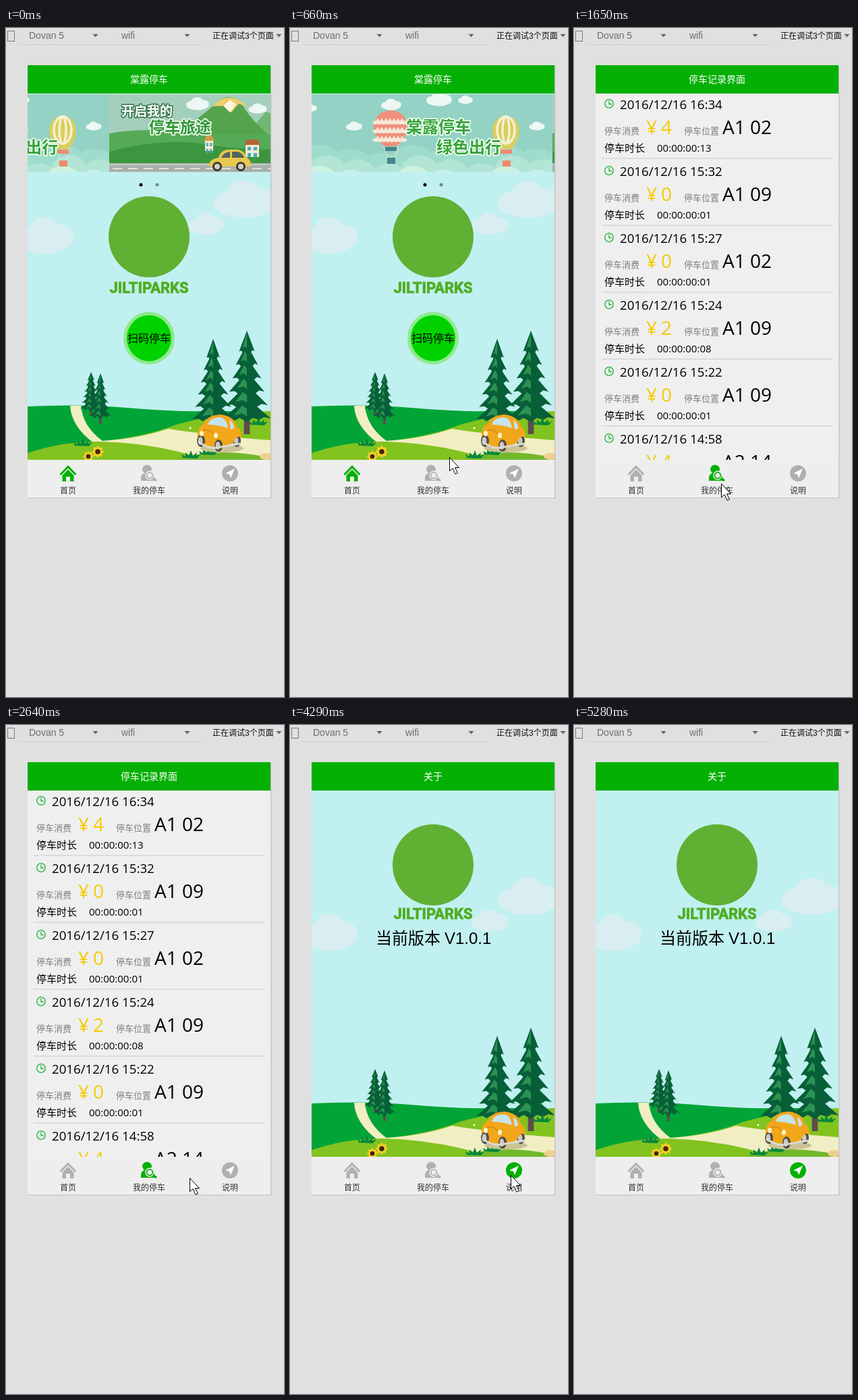
Write an HTML page that moves like this. It is 412 px wide and 990 px high and loops after 8580 ms.

```html
<!DOCTYPE html>
<html lang="zh">
<head>
<meta charset="utf-8">
<style>
  html, body { margin: 0; width: 100%; height: 100%; overflow: hidden; background: #e0e0e0; }
  svg { display: block; }
  text { font-family: "Liberation Sans", "Noto Sans CJK SC", "Noto Sans CJK", sans-serif; }
  .mid { text-anchor: middle; }
  .record text { font-family: "Open Sans", "Noto Sans CJK SC", "Noto Sans CJK", sans-serif; }
  .word { font: 700 22px Roboto, sans-serif; fill: #4fae22; stroke: #4fae22; stroke-width: .8; }
  .slogan { font-weight: 900; paint-order: stroke; stroke-width: 3.5; stroke-linejoin: round; }
  .tab { color: #b0b0b0; }
  .tab.on { color: #04b004; }
</style>
</head>
<body>
<svg id="stage" width="412" height="990" viewBox="0 0 412 990"></svg>
<script>
const LOOP = 8580;
const TITLES = ['棠露停车', '停车记录界面', '关于'];
// start time, open tab, cursor x, cursor y
const STEPS = [
  [0, 0], [330, 0], [660, 0, 236, 635], [990, 0, 218, 673], [1320, 0, 218, 674],
  [1650, 1, 218, 674], [2640, 1, 272, 670], [3630, 1, 326, 666], [3960, 1, 327, 666],
  [4290, 2, 327, 666], [4950, 2, 322, 656], [5280, 2]
];
const RECORDS = [
  ['16:34', 4, 'A1 02', 13], ['15:32', 0, 'A1 09', '01'], ['15:27', 0, 'A1 02', '01'],
  ['15:24', 2, 'A1 09', '08'], ['15:22', 0, 'A1 09', '01'], ['14:58', 4, 'A2 14', 13]
];

const path = (d, fill, extra = '') => `<path d="${d}" fill="${fill}" ${extra}/>`;
const line = (d, stroke, width = 1) => path(d, 'none', `stroke="${stroke}" stroke-width="${width}"`);
const rect = (x, y, w, h, fill, extra = '') =>
  `<rect x="${x}" y="${y}" width="${w}" height="${h}" fill="${fill}" ${extra}/>`;
const oval = (x, y, rx, ry, fill, extra = '') =>
  `<ellipse cx="${x}" cy="${y}" rx="${rx}" ry="${ry}" fill="${fill}" ${extra}/>`;
const text = (x, y, size, fill, s, extra = '') =>
  `<text x="${x}" y="${y}" font-size="${size}" fill="${fill}" ${extra}>${s}</text>`;
const group = (attrs, ...parts) => `<g ${attrs}>${parts.join('')}</g>`;
const each = (list, draw) => list.map(draw).join('');

const caret = x => path(`M${x} 9h8l-4 4.5z`, '#666');

// puffy cloud inside the box x, y, w, h
const cloud = (x, y, w, h, fill) =>
  oval(x + w * .22, y + h * .6, w * .22, h * .3, fill) +
  oval(x + w * .48, y + h * .38, w * .27, h * .38, fill) +
  oval(x + w * .76, y + h * .55, w * .24, h * .34, fill) +
  oval(x + w * .5, y + h * .75, w * .38, h * .25, fill);

function tree(x, top, w, h) {
  let out = rect(x - w * .06, top + h * .7, w * .12, h * .3, '#5f4b4d');
  for (let i = 5; i >= 0; i--) {
    const y = top + h * .13 * i, half = w * (.16 + .068 * i), drop = h * .2;
    out += path(`M${x} ${y}L${x + half} ${y + drop}l${-half * .3} -2l${-half * .2} 4l${-half * .25} -3
      L${x} ${y + drop + 5}l${-half * .3} -6l${-half * .2} 4l${-half * .2} -4L${x - half} ${y + drop}z`, '#075f38');
    out += path(`M${x} ${y + 3}l${-half * .55} ${drop * .75}l${half * .35} -3l${half * .2} 4z`, '#2c9152');
  }
  return out;
}

const tuft = (x, y) => path(`M${x - 12} ${y}l-2 -5 6 3 0 -6 5 5 3 -8 3 8 6 -5 -1 5 6 -2 -5 6z`, '#07873a');
const flower = (x, y, r) =>
  each([0, 45, 90, 135], a => oval(x, y, r, r * .35, '#f3cf25', `transform="rotate(${a} ${x} ${y})"`)) +
  oval(x, y, r * .42, r * .42, '#40250c');

function beetle() {
  const wheel = (x, y) => oval(x, y, 6, 9, '#4d4a46') + oval(x - 1, y, 3.5, 6, '#c9c7c0');
  return oval(320, 622, 32, 6, '#c9c295') + wheel(342, 611) +
    path('M284 606Q283 590 294 585Q298 573 318 572Q338 574 342 590Q350 594 349 607Q342 600 336 614L321 622L290 617Z', '#f2a71b') +
    path('M299 587Q302 576 318 576Q327 578 329 592Q313 587 299 587Z', '#c4e4ed') +
    path('M331 580Q338 584 338 593L333 594Z', '#c4e4ed') +
    line('M287 600Q301 586 312 608', '#cb820d', 1.2) + wheel(315, 618) + wheel(289, 611) +
    line('M285 612Q300 623 312 621L348 615', '#d9dad2', 3) +
    oval(290, 600, 3, 4, '#fff3c3') + oval(311, 603, 3, 4, '#fff3c3');
}

const landscape = () =>
  rect(32, 97, 360, 545, '#c1f0f0') +
  cloud(308, 226, 92, 55, '#d9eef0') + cloud(269, 273, 54, 33, '#d9eef0') + cloud(18, 280, 82, 54, '#d9eef0') +
  path('M32 560Q110 556 180 562T290 567Q340 566 392 570V640H32Z', '#02a437') +
  path('M140 612Q210 604 252 587Q320 568 392 567V640H140Z', '#82c320') +
  path('M95 559H111Q114 590 143 611Q200 607 240 593Q300 603 392 606V640H285Q220 617 130 614Q97 590 95 559Z', '#f2eec4') +
  path('M285 597Q330 596 392 603V610Q340 606 285 601Z', '#82c320') +
  path('M32 629Q85 611 140 612Q225 614 300 640H32Z', '#82c320') +
  path('M250 640Q310 618 392 636V640Z', '#72b82b') + oval(386, 634, 10, 5, '#efcf90') +
  tree(126, 509, 32, 64) + tree(140, 511, 34, 75) + tree(307, 460, 62, 140) + tree(357, 448, 72, 153) +
  tuft(114, 618) + tuft(274, 636) + tuft(300, 631) + tuft(374, 587) +
  oval(273, 592, 1.5, 1.5, '#fff') + beetle() + flower(136, 627, 9) + flower(122, 634, 8);

// the mark as a plain disc with its wordmark below
const brand = (y, base) => oval(212, y, 60, 60, '#60b033') + text(212, base, 22, '#4fae22', 'JILTIPARKS', 'class="word mid"');

function balloon(x, y, rx, ry, fill, basket) {
  const bottom = y + ry, end = bottom + 32;
  return line(`M${x - rx * .6} ${bottom - 4}L${x - 4} ${end - 8}M${x + rx * .6} ${bottom - 4}L${x + 6} ${end - 8}`, '#d9e6d3') +
    path(`M${x - rx} ${y}A${rx} ${ry} 0 0 1 ${x + rx} ${y}Q${x + rx} ${y + ry * .7} ${x + 9} ${bottom + 7}H${x - 9}Q${x - rx} ${y + ry * .7} ${x - rx} ${y}Z`, fill) +
    rect(x - 8, bottom + 8, 17, 6, basket) + rect(x - 5, end - 8, 12, 9, basket);
}
const scallops = (y, r, fill) => each([...Array(9).keys()], i => oval(i * 46 + (r % 7) * 5, y + (i % 3) * 6, r, r * .75, fill));
const smallCloud = (x, y, w = 24) => cloud(x - w / 2, y - w * .28, w, w * .56, '#eef7f3');

function skyBanner() {
  const bars = each([-10, 3, 16], dy => line(`M95 ${50 + dy}${'q3 5 6 0 3 5 6 0'.repeat(4)}`, '#f5e9d8', 5));
  const ribs = each([5, 13], r => oval(291, 53, r, 20, 'none', 'stroke="#f5f0d5" stroke-width="3.5"'));
  return rect(0, 0, 360, 116, '#93d2c4') +
    scallops(98, 31, '#a0dccc') + scallops(110, 26, '#b2e5d5') + scallops(124, 24, '#cdf1e0') +
    smallCloud(192, 7, 38) + smallCloud(121, 15, 30) + smallCloud(66, 47) + smallCloud(0, 20, 22) +
    smallCloud(337, 47, 23) + smallCloud(231, 8, 22) +
    balloon(120, 47, 25, 23, '#f08f7c', '#42868b') + bars +
    balloon(291, 53, 20, 21, '#d9cf5d', '#ee8b6d') + ribs +
    text(143, 57, 24, '#35a43b', '棠露停车', 'class="slogan" stroke="#f3fff1"') +
    text(188, 87, 24, '#35a43b', '绿色出行', 'class="slogan" stroke="#f3fff1"');
}

function roadBanner() {
  const house = (x, y, w, h, roof) => rect(x, y, w, h, '#f5ead0') +
    path(`M${x - 2} ${y}l4 -8h${w - 4}l4 8z`, roof) +
    each([.15, .6], k => rect(x + w * k, y + 3, w * .25, 5, '#49aabd') + rect(x + w * k, y + 12, w * .25, 6, '#49aabd'));
  const wheel = x => oval(x, 107, 7, 7, '#3e3935') + oval(x, 107, 4, 4, '#d5d1c5');
  return rect(0, 0, 360, 116, '#a5cfbd') +
    smallCloud(131, 14, 34) + smallCloud(220, 21, 27) + smallCloud(305, 24, 32) +
    path('M195 70L232 26Q260 33 330 75Z', '#72b773') +
    path('M75 78Q125 42 163 10Q178 -2 195 11Q210 42 258 78Z', '#53a44d') +
    path('M153 18Q179 -9 205 19L192 14 181 27 171 17Z', '#efcd6a') + path('M169 17l10 10 9 -12 -9 -7z', '#fff4da') +
    path('M0 58Q50 49 120 56T360 55V106H0Z', '#55aa58') + path('M0 85Q80 63 150 75T360 77V106H0Z', '#3c963f') +
    rect(0, 102, 360, 14, '#a9afac') + line('M0 104H360', '#dde0db') +
    line('M5 110H360', '#f1f3ed', 1.5).replace('/>', 'stroke-dasharray="14 9"/>') +
    house(142, 69, 12, 15, '#d69b45') + house(202, 75, 20, 18, '#b76334') +
    path('M148 107Q147 96 162 94Q165 82 178 82H191Q201 84 204 94Q212 98 209 107Z', '#e8c84d') +
    path('M166 94Q169 86 179 85V94ZM182 85H190Q198 87 200 94H182Z', '#52665d') + wheel(160) + wheel(195) +
    text(18, 32, 19, '#fff', '开启我的', 'class="slogan" stroke="#427f55"') +
    text(59, 57, 23, '#2f963a', '停车旅途', 'class="slogan" stroke="#eefbe9"');
}

const home = () => group('class="screen"', landscape(),
  group('clip-path="url(#bannerClip)"', group('id="slides"',
    group('transform="translate(32 98)"', skyBanner()), group('transform="translate(392 98)"', roadBanner()))),
  line('M32 97.5H392', '#e2f5ec'),
  oval(200, 232, 2.5, 2.5, '#000'), oval(224, 232, 2.5, 2.5, '#6f8c8c'), brand(309, 392),
  oval(212, 459, 38, 39, '#8eea8e'), oval(212, 459, 33, 34, '#00d200'),
  text(212, 465, 16, '#000', '扫码停车', 'class="mid"'));

const records = () => group('class="screen"', rect(32, 97, 360, 543, '#efefef'),
  each(RECORDS, ([time, cost, place, seconds], i) => group(`class="record" transform="translate(0 ${i * 99})"`,
    oval(52, 112, 6.3, 6.3, 'none', 'stroke="#1db53c" stroke-width="1.3"'), line('M52 107.5V112.5H56', '#1db53c', 1.3),
    text(68, 120, 18.7, '#000', '2016/12/16 ' + time),
    text(45, 157, 13, '#7d7d7d', '停车消费'), text('107 129', 157, 28, '#f6cb05', '¥' + cost),
    text(163, 157, 13, '#7d7d7d', '停车位置'), text(220, 157, 28, '#000', place),
    text(45, 183, 15, '#000', '停车时长'), text(123, 183, 15, '#000', '00:00:00:' + seconds),
    line('M41 193H384', '#dcdcdc', 2))));

const about = () => group('class="screen"', landscape(), brand(207, 287),
  text(127, 324, 24, '#000', '当前版本', 'font-weight="300"'), text(229, 324, 24, '#000', 'V1.0.1'));

const ICONS = [
  path('M79.500 660L92 647l12.500 13 -2 2L92 651.500 81.500 662z', 'currentColor') +
    path('M83.500 662L92 653.500l8.500 8.500V671H95V664H89V671H83.500z', 'currentColor'),
  oval(209, 653, 7, 6.5, 'currentColor') + path('M200 670Q199 659 207 658H214Q222 660 220 670Z', 'currentColor') +
    oval(213, 662, 6, 6, 'currentColor', 'stroke="#eee" stroke-width="1.5"') + oval(213, 662, 3.5, 3.5, '#eee') +
    line('M218 666L223 670', 'currentColor', 3),
  oval(332, 659, 12, 12, 'currentColor') + path('M339 652L325 659 331 660.500 333 666Z', '#fff')
];
const tabs = () => rect(32, 639, 360, 56, '#eee') +
  each(['首页', '我的停车', '说明'], (label, i) => group('class="tab"', ICONS[i],
    text(92 + 120 * i, 689, 12, '#333', label, 'class="mid"')));

stage.innerHTML =
  `<defs><clipPath id="phoneClip">${rect(32, 55, 360, 640, '#000')}</clipPath>
   <clipPath id="bannerClip">${rect(32, 98, 360, 115, '#000')}</clipPath></defs>` +
  rect(0, 0, 412, 990, '#e0e0e0') +
  rect(2.5, 4.5, 10, 15, 'none', 'stroke="#777"') +
  text(34, 16, 14, '#6e6e6e', 'Dovan 5') + text(171, 16, 14, '#6e6e6e', 'wifi') +
  text(306, 16, 12, '#111', '正在调试3个页面') + each([128.5, 264.5, 400.5], caret) + line('M19 24.5H293', '#cecece') +
  rect(33, 56, 360, 640, '#c4c4c4') + line('M393.5 57V696', '#d5d5d5') +
  group('clip-path="url(#phoneClip)"', home(), records(), about(), tabs(),
    rect(32, 55, 360, 42, '#04b004'), text(212, 81, 14, '#fff', '', 'id="heading" class="mid"')) +
  path('M.5 .5V20.500L5 16.500 9 25 12.500 23.500 8.500 15.500H14.500Z', '#fff', 'id="cursor" stroke="#000"');

const slides = document.getElementById('slides');
const heading = document.getElementById('heading');
const cursor = document.getElementById('cursor');
const screens = document.querySelectorAll('.screen');
const tabItems = document.querySelectorAll('.tab');
let shown;

function render(now) {
  const time = now % LOOP;
  const step = STEPS.findLast(s => s[0] <= time);
  if (step !== shown) {
    shown = step;
    const [start, tab, x, y] = step;
    screens.forEach((s, i) => s.style.display = i === tab ? '' : 'none');
    tabItems.forEach((t, i) => t.classList.toggle('on', i === tab));
    heading.textContent = TITLES[tab];
    slides.setAttribute('transform', `translate(${Math.round(-239 * Math.exp(-start / 150))} 0)`);
    cursor.style.display = x ? '' : 'none';
    if (x) cursor.setAttribute('transform', `translate(${x} ${y})`);
  }
  requestAnimationFrame(render);
}
const origin = performance.now();
const tick = () => render(performance.now() - origin);
requestAnimationFrame(function start() { render(0); });
</script>
</body>
</html>
```
